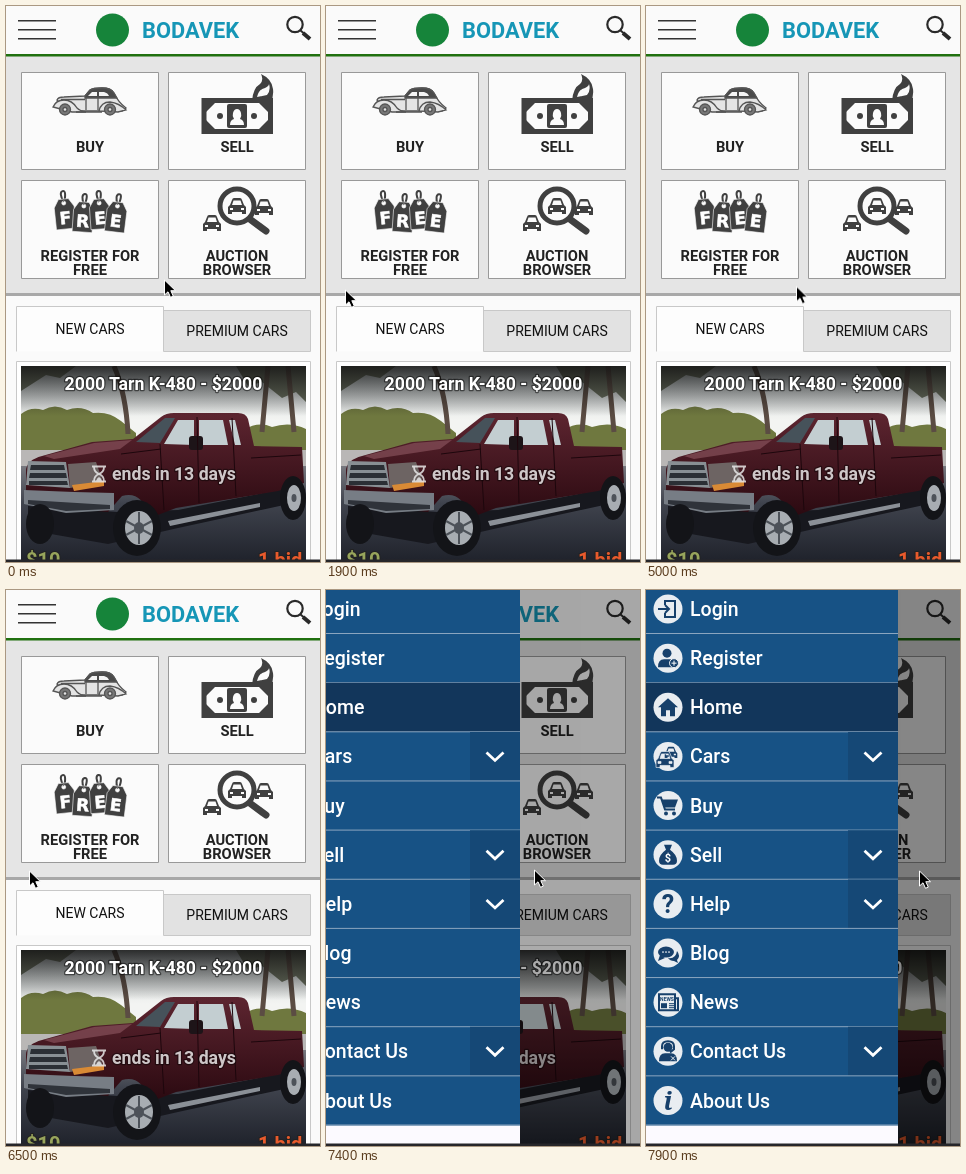
An HTML page that plays this animation: 314x556 px, repeating every 8 s.

```html
<!DOCTYPE html>
<html lang="en">
<head>
<meta charset="utf-8">
<title>Car auction menu</title>
<style>
  html, body { margin: 0; width: 100%; height: 100%; overflow: hidden; background: #f9f9f9; }
  svg { display: block; width: 314px; height: 556px; }
  text { font-family: Roboto, Arial, sans-serif; }
  .mid { text-anchor: middle; }
  .label { font-size: 14.7px; font-weight: 700; fill: #222; text-anchor: middle; }
  .tab { font-size: 14px; fill: #111; text-anchor: middle; }
  .photo { font-size: 17.7px; font-weight: 700; stroke: rgba(0,0,0,.5); stroke-width: 2.5; stroke-linejoin: round; paint-order: stroke; }
  .price { font-size: 20px; font-weight: 700; stroke: #222; stroke-width: 2; paint-order: stroke; }
  .item { font-size: 19.5px; font-weight: 500; fill: #fff; }
  .letter { font: 700 17px 'DejaVu Sans', sans-serif; fill: #fff; text-anchor: middle; }
  .card { fill: #fbfbfb; stroke: #999; }
  .line { fill: none; stroke: #17406b; stroke-width: 2; }
  #menu, #dim, #cursor { animation: 8s linear infinite; }
  #menu { animation-name: slide; }
  #dim { animation-name: dim; }
  #cursor { animation-name: move; }

  /* every segment advances in 100 ms steps */
  @keyframes slide {
    0% { transform: translateX(-252px); animation-timing-function: step-end; }
    83.75% { transform: translateX(-252px); animation-timing-function: steps(3); }
    87.5% { transform: translateX(-196px); animation-timing-function: steps(2); }
    90% { transform: translateX(-132px); animation-timing-function: steps(2); }
    92.5% { transform: translateX(-58px); animation-timing-function: steps(2); }
    95% { transform: translateX(-10px); animation-timing-function: steps(2); }
    97.5%, 100% { transform: translateX(0); }
  }
  @keyframes dim {
    0% { opacity: 0; animation-timing-function: step-end; }
    83.75% { opacity: 0; animation-timing-function: steps(3); }
    87.5% { opacity: .07; animation-timing-function: steps(2); }
    90% { opacity: .17; animation-timing-function: steps(2); }
    92.5% { opacity: .33; animation-timing-function: steps(2); }
    95% { opacity: .44; animation-timing-function: steps(2); }
    97.5%, 100% { opacity: .47; }
  }
  @keyframes move {
    0% { transform: translate(158px, 274px); animation-timing-function: steps(8); }
    10% { transform: translate(126px, 278px); animation-timing-function: steps(10); }
    22.5% { transform: translate(24px, 284px); animation-timing-function: step-end; }
    23.75% { transform: translate(19px, 284px); animation-timing-function: step-end; }
    25% { transform: translate(14px, 284px); animation-timing-function: steps(4); }
    30% { transform: translate(13px, 284px); animation-timing-function: steps(4); }
    35% { transform: translate(12px, 283px); animation-timing-function: step-end; }
    37.5% { transform: translate(12px, 283px); animation-timing-function: steps(7); }
    46.25% { transform: translate(76px, 278px); animation-timing-function: steps(2); }
    48.75% { transform: translate(98px, 278px); animation-timing-function: steps(6); }
    56.25% { transform: translate(230px, 280px); animation-timing-function: step-end; }
    57.5% { transform: translate(230px, 280px); animation-timing-function: steps(9); }
    68.75% { transform: translate(50px, 281px); animation-timing-function: steps(7); }
    77.5% { transform: translate(23px, 281px); animation-timing-function: step-end; }
    83.75% { transform: translate(23px, 281px); animation-timing-function: steps(3); }
    87.5% { transform: translate(78px, 280px); animation-timing-function: steps(2); }
    90% { transform: translate(140px, 280px); animation-timing-function: steps(2); }
    92.5% { transform: translate(208px, 280px); animation-timing-function: steps(2); }
    95% { transform: translate(258px, 281px); animation-timing-function: steps(3); }
    98.75%, 100% { transform: translate(273px, 281px); }
  }
</style>
</head>
<body>
<svg viewBox="0 0 314 556">
  <defs>
    <clipPath id="frame"><path d="M15 360h285v194H15z"/></clipPath>
    <linearGradient id="sky" x2="0" y2="1">
      <stop stop-color="#c3cbcd"/><stop offset=".6" stop-color="#f3f4f2"/>
    </linearGradient>
    <linearGradient id="road" x2="0" y2="1">
      <stop stop-color="#77787f"/><stop offset=".4" stop-color="#3f434d"/><stop offset="1" stop-color="#20232c"/>
    </linearGradient>
    <linearGradient id="shade" x2="0" y2="1">
      <stop stop-color="#111" stop-opacity=".85"/><stop offset="1" stop-color="#111" stop-opacity="0"/>
    </linearGradient>
    <linearGradient id="paint" x2="0" y2="1">
      <stop stop-color="#5d2530"/><stop offset="1" stop-color="#2a0910"/>
    </linearGradient>
    <path id="car" fill-rule="evenodd" d="M-9 8V1l2-2 2-5q.5-2 2-2h6q1.500 0 2 2l2 5 2 2v7h-4V6H-5v2zM-5-1H5L3.500-5.500h-7zM-7 2h3v2h-3zM4 2h3v2H4z"/>
    <path id="tag" d="M-10-8L-5-16H5L10-8V14H-10zM-2-12a2 2 0 1 0 4 0a2 2 0 1 0-4 0" fill-rule="evenodd"/>
    <path id="loop" d="M0-13q-4-10 0-11t1 10" fill="none" stroke="#404040" stroke-width="2"/>
  </defs>

  <!-- header -->
  <path fill="#fafafa" d="M0 0h314v556H0z"/>
  <path fill="#e5e5e5" d="M0 50h314v238H0z"/>
  <path fill="#20700f" d="M0 48h314v2.500H0z"/>
  <path fill="#a8a8a8" d="M0 287h314v3H0z"/>
  <path stroke="#333" stroke-width="1.500" d="M12 14.700h38M12 23.700h38M12 32.700h38"/>
  <circle cx="106.500" cy="24" r="16.500" fill="#16843a"/>
  <text x="136" y="32" font-size="21.800" font-weight="700" fill="#1696b6">BODAVEK</text>
  <g fill="none" stroke="#2a2a2a">
    <circle cx="289" cy="18.500" r="7.700" stroke-width="2.200"/>
    <path stroke-width="2" d="M294 24l4 3.500"/>
    <path stroke-width="4" d="M297 27l7 6"/>
  </g>

  <!-- tiles -->
  <path class="card" d="M15.500 66.500h137v97h-137zM162.500 66.500h137v97h-137zM15.500 174.500h137v98h-137zM162.500 174.500h137v98h-137z"/>
  <text class="label" x="84" y="146">BUY</text>
  <text class="label" x="231" y="146">SELL</text>
  <text class="label" x="84" y="255">REGISTER FOR</text>
  <text class="label" x="84" y="269">FREE</text>
  <text class="label" x="231" y="255">AUCTION</text>
  <text class="label" x="231" y="269">BROWSER</text>

  <g fill="#e4e4e4" stroke="#555" stroke-width="1.300">
    <path d="M51 94q1-3 7-3l21-1 5-6q3-2 12-2 9 0 12 5 4 9 12 15l-4 3H60z"/>
    <path fill="#4a4a4a" d="M79 90l5-6q3-2 12-2 9 0 12 5l3 5H79z"/>
    <path fill="#f4f4f4" stroke="none" d="M82 90l4-4h5v4zM93 86h5q4 1 5 4H93z"/>
    <path d="M47 101q3-7 11-7 8 0 13 8 3 3 9 4H66zM93 105q2-9 11-9 9 1 16 8l-8 2z"/>
    <path fill="none" d="M55 93.500h24M80 92v12M92 92v12M70 106h26"/>
    <circle cx="59" cy="103.500" r="5.500" fill="#777"/><circle cx="104" cy="103.500" r="5.500" fill="#777"/>
    <circle cx="59" cy="103.500" r="2"/><circle cx="104" cy="103.500" r="2"/>
  </g>
  <g fill="#404040">
    <path fill="none" stroke="#404040" stroke-width="5" d="M198 94.500h66.500v31h-66.500z"/>
    <path d="M246 95q1-13 8-17 4-4 1-10 11 5 12 15 1 8-3 16z"/>
    <path fill="#fbfbfb" d="M251 91q2-8 8-9 4-2 4-4 2 6-2 11z"/>
    <rect x="221" y="98" width="20" height="24" rx="2"/>
    <path fill="#fbfbfb" d="M224 119q0-5 4-6-2-3-1-6 1-4 4-4 3 0 4 4 1 3-1 6 4 1 4 6z"/>
    <path d="M200 97h9l-9 9zM262 97h-9l9 9zM200 123h9l-9-9zM262 123h-9l9-9z"/>
    <circle cx="214" cy="110" r="3"/><circle cx="248" cy="110" r="3"/>
  </g>
  <g fill="#404040" stroke="#fbfbfb" stroke-width=".6">
    <g transform="translate(59 209) rotate(-6)"><use href="#loop"/><use href="#tag"/><text class="letter" y="9">F</text></g>
    <g transform="translate(77 212) rotate(4)"><use href="#loop"/><use href="#tag"/><text class="letter" y="9">R</text></g>
    <g transform="translate(94 209) rotate(-4)"><use href="#loop"/><use href="#tag"/><text class="letter" y="9">E</text></g>
    <g transform="translate(110 212) rotate(7)"><use href="#loop"/><use href="#tag"/><text class="letter" y="9">E</text></g>
  </g>
  <g fill="#404040">
    <circle cx="231" cy="200" r="17" fill="none" stroke="#404040" stroke-width="5"/>
    <path stroke="#404040" stroke-width="7" stroke-linecap="round" d="M245 214l15 11"/>
    <use href="#car" x="231" y="200"/>
    <use href="#car" x="206" y="217"/>
    <use href="#car" x="258" y="201"/>
  </g>

  <!-- tabs -->
  <path fill="#e2e2e2" stroke="#c8c8c8" d="M157.500 304.500h147v41h-147z"/>
  <path fill="#fdfdfd" stroke="#c8c8c8" d="M10.500 345.500v-45h147v45"/>
  <text class="tab" x="84" y="328">NEW CARS</text>
  <text class="tab" x="231" y="330">PREMIUM CARS</text>

  <!-- listing -->
  <path fill="#fff" stroke="#c8c8c8" d="M10.500 570V355.500h294V570"/>
  <g clip-path="url(#frame)">
    <path fill="url(#sky)" d="M15 360h285v90H15z"/>
    <path fill="#6a705f" d="M15 360h55l-16 12-14-3-25 16zM230 360h70v36l-10-10-14 6-20-16-14 4z"/>
    <path fill="#6f783f" d="M15 408q10-8 22-4 12-7 24 0 14-5 26 3 16-2 28 8l15 12v24H15zM238 424q14-9 28-3 18-6 34 2v24h-62z"/>
    <path fill="none" stroke="#5b4c43" stroke-width="5" d="M122 428q-2-40-14-68M256 426l6-66M288 426l-6-66"/>
    <path fill="#b9b7b6" d="M15 444h285v22H15z"/>
    <path fill="url(#road)" d="M15 460h285v94H15z"/>
    <path fill="#17181e" d="M22 500l90 6 60-2 110-22 10 14-120 26-70 16-80-14z"/>
    <path fill="url(#paint)" d="M20 464q1-10 16-14l50-14 41-3 28-22q5-4 13-4h64q8 0 10 6l6 27 48 1 2 36-26 8-102 17-26 10q-8-28-28-22l-14 16-82-8z"/>
    <path fill="#87505b" opacity=".7" d="M38 450l50-13 38-3-12 9-66 10z"/>
    <path fill="#46525a" d="M130 436l29-24h10l-15 25z"/>
    <path fill="#c3ced1" d="M158 438l14-24h16v25zM193 414h24l5 25h-29zM223 414h6l6 25h-6z"/>
    <rect x="183" y="430" width="14" height="14" rx="3" fill="#1d1418"/>
    <path fill="none" stroke="#1d060c" d="M154 438l4 66M191 411l2 86M226 412l4 78M115 448l40-5M245 452l50-3"/>
    <path fill="#888f94" d="M22 455l38 1 4 26-44-3z"/>
    <path fill="#2b2f35" d="M25 459h33l1 5H24zM24 467h36l1 5H23zM23 475h38l1 4H23z"/>
    <path fill="#6d6463" d="M62 458l28-2 7 20-33 6z"/>
    <path fill="#d98a35" d="M66 479l32-4v5l-30 5z"/>
    <path fill="#777d85" d="M18 484l50 2 40 1v17l-48 3-42-9z"/>
    <path fill="#2f333a" d="M22 494l82 5v4l-44 2-38-7z"/>
    <path fill="#8b9097" d="M162 515l92-18v4l-90 19z"/>
    <g fill="#131418"><ellipse cx="131" cy="522" rx="24" ry="28"/><ellipse cx="287" cy="492" rx="13" ry="22"/><ellipse cx="34" cy="518" rx="14" ry="20"/></g>
    <g fill="#a8adb2"><ellipse cx="133" cy="522" rx="14" ry="17"/><ellipse cx="288" cy="492" rx="7" ry="13"/></g>
    <g fill="#4d5259"><ellipse cx="133" cy="522" rx="5" ry="6"/><ellipse cx="288" cy="492" rx="2.500" ry="4"/></g>
    <path fill="none" stroke="#4d5259" stroke-width="2" d="M133 506v32M120 515l26 14M120 529l26-14"/>
    <path fill="url(#shade)" d="M15 360h285v50H15z"/>
    <text class="price" x="20" y="561" fill="#98a55c">$10</text>
    <text class="price" x="252" y="561" fill="#e85a2c">1 bid</text>
  </g>
  <text class="photo mid" x="157.500" y="384" fill="#fff">2000 Tarn K-480 - $2000</text>
  <g opacity=".82">
    <text class="photo" x="106" y="474" fill="#eee">ends in 13 days</text>
    <path fill="none" stroke="#eee" stroke-width="1.800" d="M86 460.500h14M86 475.500h14M88 461q0 5 5 7-5 2-5 7M98 461q0 5-5 7 5 2 5 7"/>
    <path fill="#eee" d="M90 475q1-3 3-4 2 1 3 4z"/>
  </g>

  <path id="dim" d="M0 0h314v556H0z"/>

  <g id="menu">
    <path fill="#fcfaff" d="M0 0h252v556H0z"/>
    <path fill="#175285" d="M0 0h252v535.500H0z"/>
    <g id="rows"></g>
  </g>

  <path fill="#26262a" d="M0 553.500h314v3H0z"/>
  <g id="cursor"><path stroke="#fff" d="M.5 0v15l3.500-3.200 2.500 5.500 2.800-1.200-2.500-5.400H11.500z"/></g>
</svg>
<script>
  const items = [
    ['Login', '<path class="line" d="M-3-4v-4H7V8H-3V4M-10 0H1M-3-4l4 4-4 4"/>'],
    ['Register', '<circle cx="-1" cy="-5" r="4.500"/><path d="M-10 9q0-8 6-8h6q6 0 6 8z"/><circle cx="6" cy="5" r="4.500" stroke="#e9edf1"/><path stroke="#fff" d="M6 2.500v5M3.500 5h5"/>'],
    ['Home', '<path d="M-10 0L0-9 10 0H7V9H2V3H-2V9H-7V0z"/>'],
    ['Cars', '<use href="#car" transform="translate(3 -4) scale(.7)"/><use href="#car" x="-3" y="3" stroke="#e9edf1" stroke-width=".7"/>', 1],
    ['Buy', '<path class="line" d="M-11-8h4l4 12h10"/><path d="M-6-6H10L7 2H-4z"/><circle cx="-2" cy="8" r="2"/><circle cx="6" cy="8" r="2"/>'],
    ['Sell', '<path d="M-4-10H4L2-5Q9 0 9 6q0 4-4 4H-5q-4 0-4-4 0-6 7-11z"/><text class="mid" y="7" font-size="11" font-weight="700" fill="#fff">$</text>', 1],
    ['Help', '<text class="mid" y="9" font-size="25" font-weight="700">?</text>', 1],
    ['Blog', '<ellipse cx="-2" cy="-1" rx="8" ry="5.500"/><path d="M-8 2l-2 6 7-3zM0 5q8 1 9-7 4 5 0 9l1 3-4-2q-4 0-6-3z"/><path stroke="#fff" d="M-6-1h2M-3-1h2M0-1h2"/>'],
    ['News', '<path class="line" stroke-width="1.500" d="M-9-8H7V8H-9zM7-4h3V8H7"/><text class="mid" x="-1" y="-1.500" font-size="5" font-weight="700">NEWS</text><path d="M-7 1h6v5h-6z"/><path stroke="#17406b" d="M1 1.500h5M1 3.500h5M1 5.500h5"/>'],
    ['Contact Us', '<circle cx="0" cy="-4" r="4.500"/><path d="M-9 10q0-8 6-8h6q6 0 6 8z"/><path class="line" stroke-width="1.500" d="M-6-2v-3q0-5 6-5t6 5v3l-4 3"/><path stroke="#e9edf1" d="M3 5l4 4M7 5l-4 4"/>', 1],
    ['About Us', '<text class="mid" y="9" font-size="25" font-weight="700" font-style="italic" style="font-family:\'Noto Serif\',serif">i</text>']
  ];
  const pitch = 49.15;

  document.getElementById('rows').innerHTML = items.map(([name, icon, more], i) => `
    <g transform="translate(0 ${19 + i * pitch})">
      ${name === 'Home' ? '<path fill="#12365b" d="M0-24.500h252v49H0z"/>' : ''}
      ${more ? `<path fill="#154876" d="M202-24.500h50v49h-50z"/>
        <path fill="none" stroke="#fff" stroke-width="2.800" d="M218.500-4l8.500 8 8.500-8"/>` : ''}
      <path stroke="#8ba5bf" d="M0 24.500h252"/>
      <circle cx="22" r="14.500" fill="#e9edf1"/>
      <g transform="translate(22 0)" fill="#17406b">${icon}</g>
      <text class="item" x="44" y="7">${name}</text>
    </g>`).join('');
</script>
</body>
</html>
```
